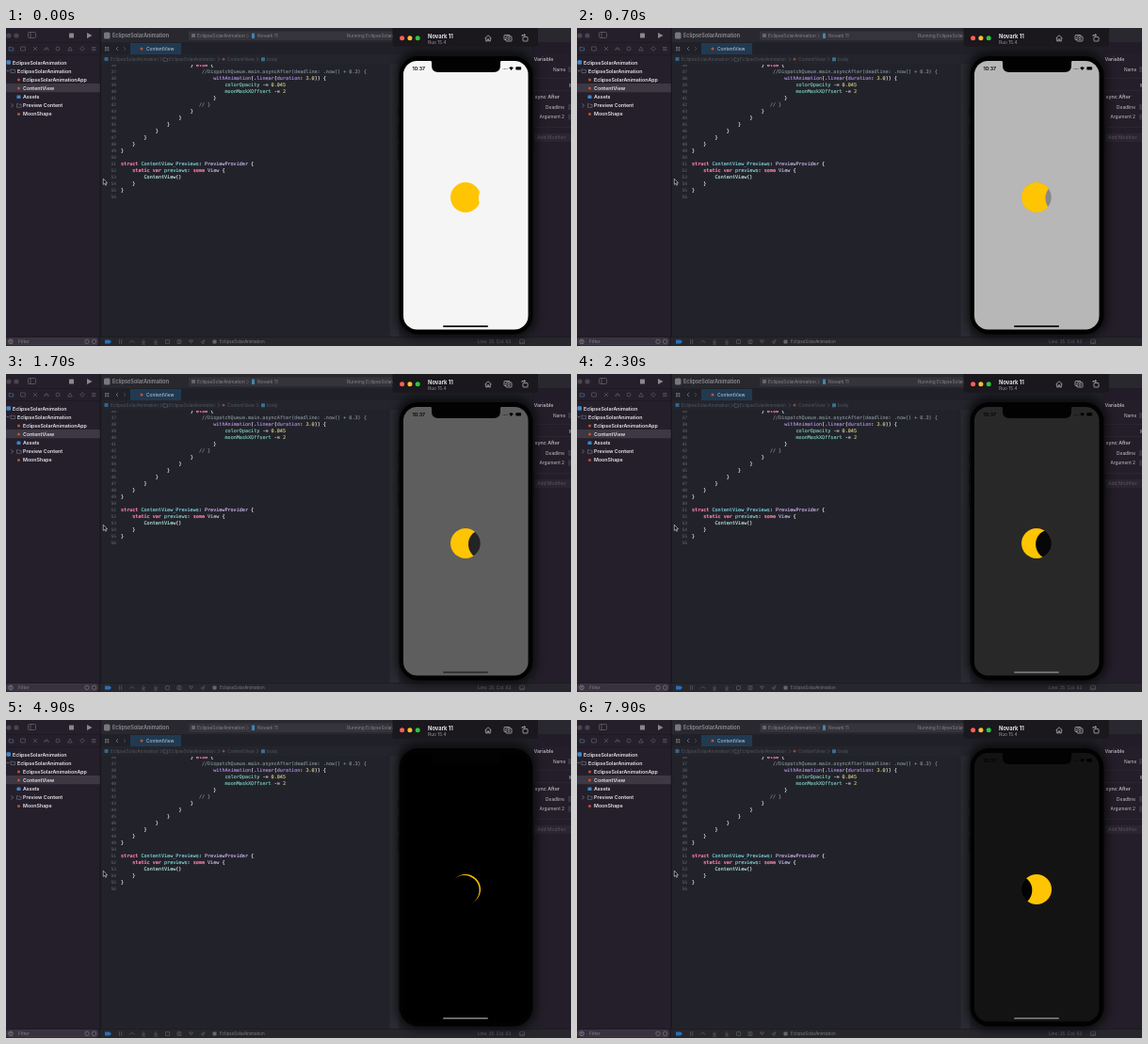
Write an HTML page that moves like this. It is 600 px wide and 338 px high and loops after 8 s.

```html
<!DOCTYPE html>
<html lang="en">
<head>
<meta charset="utf-8">
<title>Eclipse preview</title>
<style>
  html, body { margin: 0; width: 100%; height: 100%; overflow: hidden; background: #22232a; }
  svg { display: block; width: 600px; height: 338px; }
  text { font-family: Inter, "Liberation Sans", sans-serif; white-space: pre; }
  .code { font-family: "DejaVu Sans Mono", "Liberation Mono", monospace; font-size: 5.1px; }
</style>
</head>
<body>
<svg id="stage" viewBox="0 0 600 338" xmlns="http://www.w3.org/2000/svg"></svg>
<script>
const LOOP = 8000, STEP = 100;
const PROJECT = "EclipseSolarAnimation", DEVICE = "Novark 11", SYSTEM = "Ruo 15.4";
const SUN = { x: 488, y: 180, r: 16 };
const parts = [];
const add = markup => parts.push(markup);

const rect = (x, y, w, h, fill, r = 0, more = "") =>
  add(`<rect x="${x}" y="${y}" width="${w}" height="${h}" rx="${r}" fill="${fill}" ${more}/>`);
const circle = (x, y, r, fill, more = "") =>
  add(`<circle cx="${x}" cy="${y}" r="${r}" fill="${fill}" ${more}/>`);
const line = (d, color, width = 0.7, fill = "none") =>
  add(`<path d="${d}" fill="${fill}" stroke="${color}" stroke-width="${width}"/>`);
const label = (x, y, str, size, color, weight = 400, anchor = "start") =>
  add(`<text x="${x}" y="${y}" font-size="${size}" fill="${color}" font-weight="${weight}" text-anchor="${anchor}">${str}</text>`);
const chevron = (x, y, color, dir = 1) =>
  line(`M${x - dir} ${y - 2}l${2 * dir} 2l${-2 * dir} 2`, color);
const folder = (x, y, color) =>
  line(`M${x} ${y - 1.6}h1.8l.6.6h2.2v3h-4.6z`, color, 0.6);

function drawSidebar() {
  rect(0, 0, 100, 338, "#251f2b");
  [3, 11].forEach(x => circle(x, 8, 2.6, "#4a444f"));
  rect(23.5, 4.5, 8, 6, "none", 1, 'stroke="#6d6872" stroke-width=".7"');
  line("M26 4.5v6", "#6d6872");
  rect(67, 5.5, 5, 5, "#8b868f", 0.5);
  add('<path d="M86 5l5.5 3l-5.5 3z" fill="#8b868f"/>');
  rect(0, 15, 100, 0.6, "#1b1620");
  rect(0, 28, 100, 0.6, "#1b1620");

  const gray = "#6c6672";
  folder(3.2, 22, "#4f7fa8");
  rect(15.5, 20, 5, 4, "none", 0.5, `stroke="${gray}" stroke-width=".6"`);
  line("M29 20l4 4m0-4l-4 4", gray, 0.6);
  line("M41 24v-2h4v2M43 20v2", gray, 0.6);
  circle(55, 22, 2, "none", `stroke="${gray}" stroke-width=".6"`);
  line("M68 20l2.3 4h-4.6z", gray, 0.6);
  line("M81 19.7l2.4 2.3l-2.4 2.3l-2.4-2.3z", gray, 0.6);
  line("M91 20.5h4.5m-4.5 1.6h4.5m-4.5 1.6h4.5", gray, 0.6);

  rect(0, 59, 100, 9.2, "#3d3843", 1);
  rect(0.5, 34.3, 4.5, 4.5, "#3f86c8", 1);
  label(7, 38.6, PROJECT, 5.3, "#e6e4e8", 600);
  line("M.6 44.6l1.5 1.6l1.5-1.6", "#8c8792");
  folder(5, 45.6, "#74808c");
  label(12, 47.6, PROJECT, 5.3, "#e6e4e8", 600);
  ["EclipseSolarAnimationApp", "ContentView", "Assets", "Preview Content", "MoonShape"].forEach((name, i) => {
    const y = 55 + 9.1 * i;
    if (i === 3) { chevron(6.5, y, "#8c8792"); folder(11.5, y, "#74808c"); }
    else if (i === 2) rect(11.5, y - 1.8, 4, 3.6, "#3f86c8", 0.6);
    else circle(13.5, y, 1.5, "#c2532f");
    label(18, y + 2, name, 5.3, "#e6e4e8", 600);
  });

  rect(0, 328, 100, 0.6, "#1b1620");
  rect(0.5, 329.5, 97, 7.5, "#38323e", 2, 'stroke="#56505c" stroke-width=".4"');
  circle(5, 333.3, 2.3, "none", 'stroke="#a29da6" stroke-width=".6"');
  line("M3.7 332.7h2.6m-2 1.3h1.4", "#a29da6", 0.5);
  label(13, 335.2, "Filter", 5, "#85808a");
  [86, 93.5].forEach(x => circle(x, 333.3, 2.2, "none", 'stroke="#8a858e" stroke-width=".6"'));
}

function drawToolbars() {
  rect(100, 0, 500, 15, "#29282f");
  rect(104, 4.5, 6.5, 7, "#77777d", 1.6);
  label(113, 10.2, PROJECT, 5.55, "#8e8d93", 600);
  rect(194, 3.5, 230, 9.5, "#35343b", 2);
  rect(197, 6, 4, 4, "#67666c", 0.8);
  label(203, 10.2, PROJECT, 4.85, "#85848a");
  chevron(256.5, 8.4, "#67666c");
  rect(261, 5.6, 3, 5.5, "#3f86b5", 0.6);
  label(267, 10.2, DEVICE, 4.85, "#85848a");
  label(362, 10.2, "Running " + PROJECT, 4.85, "#85848a");

  rect(100, 15, 500, 13, "#202128");
  rect(132, 16, 54, 12, "#203a52");
  [[105, 20], [107.5, 20], [105, 22.5], [107.5, 22.5]].forEach(([x, y]) => rect(x, y, 1.8, 1.8, "#6b6b73"));
  chevron(118, 22, "#85858c", -1);
  chevron(126, 22, "#55555c");
  circle(144, 22, 1.5, "#c2532f");
  label(149, 23.9, "ContentView", 4.9, "#c8d0d8");

  const dim = "#54555d";
  rect(100, 28, 318, 10, "#24252c");
  rect(104.5, 31, 4, 4, "#34658c", 0.8);
  label(111, 35, PROJECT, 4.9, dim);
  chevron(164.5, 33.2, dim);
  folder(167, 33.2, "#5a6570");
  label(173, 35, PROJECT, 4.7, dim);
  chevron(226, 33.2, dim);
  circle(231, 33.2, 1.4, "#8f482c");
  label(235, 35, "ContentView", 4.8, dim);
  chevron(267, 33.2, dim);
  rect(271, 31.3, 4, 4, "#39708f", 0.6);
  label(277, 35, "body", 4.8, dim);
}

function drawCode() {
  const C = { key: "#fc7fb0", type: "#86dde8", lib: "#d6bcf8", fn: "#b891ea", num: "#dccd86",
              prop: "#82d0c0", call: "#c4f2ea", plain: "#f0f0f2", note: "#848e97" };
  // Rows hold a line number, an indent in characters and coloured runs.
  const rows = [
    [36, 24, ["plain", "} "], ["key", "else"], ["plain", " {"]],
    [37, 28, ["note", "//DispatchQueue.main.asyncAfter(deadline: .now() + 0.3) {"]],
    [38, 32, ["fn", "withAnimation"], ["plain", "(."], ["fn", "linear"], ["plain", "("], ["fn", "duration"],
      ["plain", ": "], ["num", "3.0"], ["plain", ")) {"]],
    [39, 36, ["prop", "colorOpacity"], ["plain", " -= "], ["num", "0.045"]],
    [40, 36, ["prop", "moonMaskXOffsert"], ["plain", " -= "], ["num", "2"]],
    [41, 32, ["plain", "}"]],
    [42, 27, ["note", "// }"]],
    ...[43, 44, 45, 46, 47, 48, 49].map((n, i) => [n, 24 - 4 * i, ["plain", "}"]]),
    [51, 0, ["key", "struct"], ["type", " ContentView_Previews"], ["plain", ": "], ["lib", "PreviewProvider"], ["plain", " {"]],
    [52, 4, ["key", "static var"], ["type", " previews"], ["plain", ": "], ["key", "some"], ["lib", " View"], ["plain", " {"]],
    [53, 8, ["call", "ContentView"], ["plain", "()"]],
    [54, 4, ["plain", "}"]],
    [55, 0, ["plain", "}"]]
  ];
  const baseline = n => 146.3 + (n - 51) * 7.03;
  add('<clipPath id="editor"><rect x="100" y="39" width="312" height="289"/></clipPath><g clip-path="url(#editor)">');
  for (let n = 36; n <= 56; n++)
    add(`<text class="code" x="117" y="${baseline(n)}" text-anchor="end" fill="#696c75" style="font-size:4.5px">${n}</text>`);
  for (const [n, indent, ...runs] of rows) {
    const spans = runs.map(([kind, str]) =>
      `<tspan fill="${C[kind]}" stroke="${C[kind]}" stroke-width=".12"${kind === "key" ? ' font-weight="700"' : ""}>${str}</tspan>`).join("");
    add(`<text class="code" x="${122 + indent * 3.07}" y="${baseline(n)}">${spans}</text>`);
  }
  add("</g>");
  rect(407.5, 38, 10, 290, "#2b2c33");
}

function drawDebugBar() {
  const gray = "#5c5c64";
  rect(100, 328, 500, 10, "#27262d");
  rect(100, 328, 500, 0.6, "#17171c");
  add('<path d="M105 331.5h5l2 2l-2 2h-5z" fill="#2670bd"/>');
  line("M120.5 331v5m2.2-5v5", gray);
  line("M131 334.5q3-4 5 0M146 331v3m-2-1l2 2l2-2m-4 3h4M159 331v3m-2-1l2 2l2-2m-4 3h4", gray);
  rect(169.5, 331.5, 4, 4, "none", 0.5, `stroke="${gray}" stroke-width=".7"`);
  line("M182 331.8h4v3.5h-4zM184 331v5", gray);
  line("M194.5 332l2 3l2-3z", gray);
  line("M207 334l4-2.4l-1.6 4.2l-.8-1.6z", gray);
  rect(219.5, 331.5, 4, 4, "#66666d", 0.8);
  label(227, 335.2, PROJECT, 4.55, "#7c7c83");
  label(501, 335.2, "Line: 35  Col: 63", 4.6, "#6d6d74");
  rect(545.5, 331.2, 5, 4.4, "none", 0.6, `stroke="${gray}" stroke-width=".7"`);
  line("M545.5 334.2h5", gray);
}

function drawInspector() {
  rect(558, 15, 42, 313, "#231e29");
  rect(558, 15, 42, 13, "#211c27");
  label(560.5, 34.8, "Variable", 5.3, "#b3b0b6", 600);
  label(581, 45.8, "Name", 4.8, "#c3c0c6");
  rect(597, 41, 6, 6, "#39333f");
  rect(560, 53, 40, 0.5, "#332d39");
  rect(560, 66, 40, 0.5, "#332d39");
  label(598, 63, "M", 4.8, "#c3c0c6");
  label(561.5, 74.8, "sync After", 5.3, "#b3b0b6", 600);
  label(593, 85.8, "Deadline", 4.8, "#c3c0c6", 400, "end");
  label(593, 96, "Argument 2", 4.8, "#c3c0c6", 400, "end");
  [81, 91.5].forEach(y => rect(597, y, 6, 6, "#39333f"));
  rect(560, 105, 40, 0.5, "#332d39");
  rect(558, 112, 42, 9, "#2b2531");
  label(564, 118.3, "Add Modifier", 5, "#5c5661");
}

function drawDevice() {
  rect(414, 24, 149, 306, "#000", 24, 'opacity=".6" filter="url(#soft)"');
  rect(410.5, -4, 154.5, 23.8, "#1a171d", 3);
  ["#ff5f57", "#febc2e", "#28c840"].forEach((c, i) => circle(420.6 + 8.3 * i, 10.8, 2.5, c));
  label(448, 10.6, DEVICE, 5.8, "#e4e2e6", 700);
  label(448, 17, SYSTEM, 4.9, "#98959b");
  const icon = "#c9c6cb";
  line("M508.5 11l3.5-3.2l3.5 3.2M509.7 10.3v3.7h1.6v-2.2h1.4v2.2h1.6v-3.7", icon);
  rect(529, 7.5, 6, 5, "none", 0.8, `stroke="${icon}" stroke-width=".7"`);
  rect(531, 9, 6, 5, "#1a171d", 0.8, `stroke="${icon}" stroke-width=".7"`);
  circle(534, 11.5, 1.1, "none", `stroke="${icon}" stroke-width=".6"`);
  rect(549, 9.5, 5, 4.5, "none", 0.6, `stroke="${icon}" stroke-width=".7"`);
  line("M548 9v-1.5h3.5m-1.2-1.2l1.3 1.2l-1.3 1.2", icon);

  [[416.4, 84, 10], [416.4, 102, 17], [416.4, 124, 17], [559.6, 105, 28]].forEach(([x, y, h]) => rect(x, y, 1.2, h, "#0e0e10", 0.4));
  rect(417.3, 29.5, 142.4, 296.5, "#020202", 21, 'stroke="#141416" stroke-width=".7"');
  rect(422, 35, 132.5, 285.5, "#f5f5f5", 14.5, 'id="screen"');
  add('<path d="M449 34h79q-3 0-3 3v3q0 7-7 7h-59q-7 0-7-7v-3q0-3-3-3z" fill="#020202"/>');
  label(431.5, 45, "10:37", 5.2, "#000", 600);
  [0, 1, 2, 3].forEach(i => circle(528 + 1.4 * i, 43.4, 0.45, "#000"));
  add('<path d="M534.2 42.2q2.3-2 4.6 0l-2.3 2.8z"/>');
  rect(541.3, 41.3, 5.8, 3.3, "#000", 0.8);
  rect(464, 316.3, 48, 1.6, "#000", 0.8, 'id="home"');

  // The shaded disc shows wherever the moon cuts the sun away.
  circle(SUN.x, SUN.y, SUN.r - 0.3, "#000", 'id="shade"');
  add('<mask id="uncovered" maskUnits="userSpaceOnUse" x="460" y="150" width="60" height="60">');
  rect(460, 150, 60, 60, "#fff");
  circle(518, 181, 16.1, "#000", 'id="moon"');
  add("</mask>");
  circle(SUN.x, SUN.y, SUN.r, "#ffc402", 'mask="url(#uncovered)"');
}

add('<filter id="soft" x="-20%" y="-20%" width="140%" height="140%"><feGaussianBlur stdDeviation="5"/></filter>');
rect(0, 0, 600, 338, "#22232a");
drawToolbars();
drawCode();
drawSidebar();
rect(99.8, 0, 0.8, 338, "#131217");
drawInspector();
drawDebugBar();
drawDevice();
add('<path d="M103.3 160.3v6l1.4-1.2l1 2.1l1-.5l-1-2h1.8z" fill="#000" stroke="#eee" stroke-width=".6"/>');

const stage = document.getElementById("stage");
stage.innerHTML = parts.join("");
const [screenEl, homeEl, shadeEl, moonEl] = ["screen", "home", "shade", "moon"].map(id => document.getElementById(id));

const clamp01 = v => Math.min(1, Math.max(0, v));
const gray = v => { const n = Math.round(v); return `rgb(${n},${n},${n})`; };

function render(ms) {
  const day = 245 * (1 - clamp01(ms / 2750));
  const dawn = 19 * clamp01((ms - 6300) / 1600);
  const sky = day + dawn;
  screenEl.setAttribute("fill", gray(sky));
  shadeEl.setAttribute("fill", gray(sky * sky / 245));
  moonEl.setAttribute("cx", SUN.x + 30 - 6.43 * ms / 1000);
  homeEl.setAttribute("fill", gray(118 * clamp01((ms - 1500) / 500)));
}

function tick() {
  const ms = performance.now() % LOOP;
  render(Math.floor(ms / STEP) * STEP);
  requestAnimationFrame(tick);
}
tick();
</script>
</body>
</html>
```
